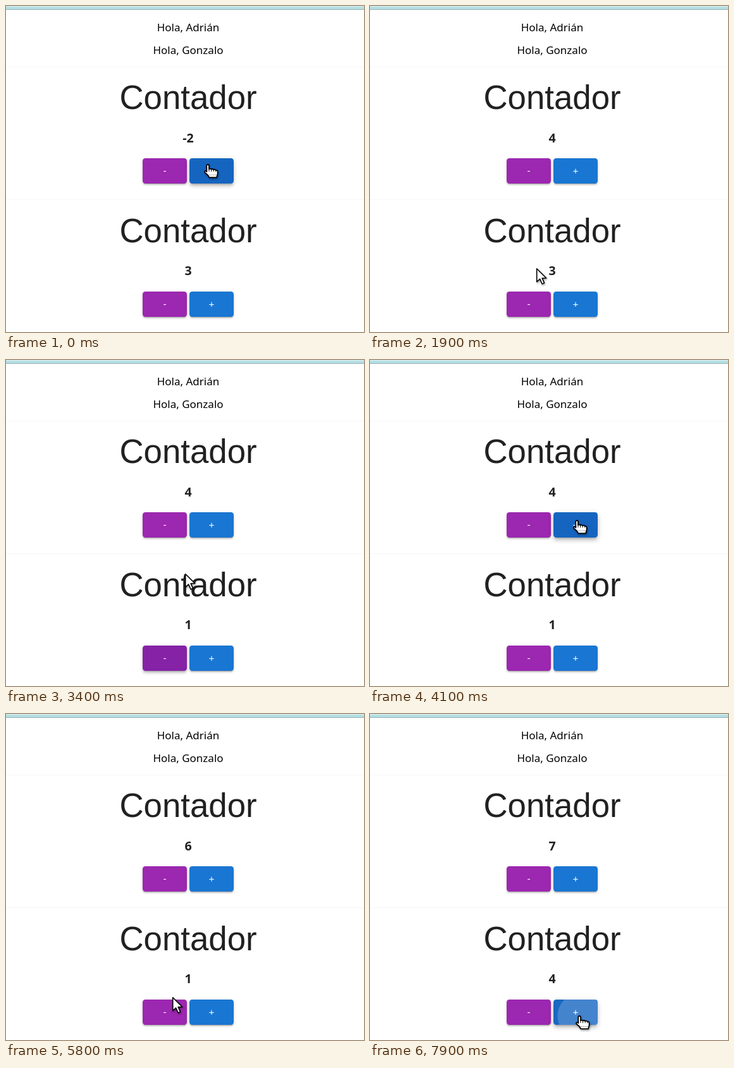
An HTML page for the animation above (8 s loop, 566 by 516 pixels).

```html
<!DOCTYPE html>
<html lang="es">
<head>
<meta charset="utf-8">
<title>Contador</title>
<style>
  html, body { margin: 0; width: 100%; height: 100%; overflow: hidden; background: #fff; }
  #stage { position: relative; width: 566px; height: 516px; overflow: hidden; }
  svg { position: absolute; left: 0; top: 0; overflow: visible; }
  text { text-anchor: middle; }
  .hello { font: 17px "Noto Sans", "Open Sans", sans-serif; }
  .title { font: 52.8px "Liberation Sans", Arial, sans-serif; fill: #212121; }
  .count { font: bold 19.6px "Noto Sans", "Open Sans", sans-serif; fill: #212121; }
  .btn {
    position: absolute; width: 70px; height: 40px; border-radius: 4.4px;
    color: #fff; font: 15.4px/40px "Liberation Sans", Arial, sans-serif; text-align: center;
  }
  .clip { position: absolute; inset: 0; overflow: hidden; border-radius: inherit; }
  .ripple { position: absolute; border-radius: 50%; background: #fff; }
  #cursor { filter: drop-shadow(1px 2px 1.5px rgba(0, 0, 0, .35)); }
  #cursor path { stroke-linejoin: round; stroke-linecap: round; }
</style>
</head>
<body>
<div id="stage">
  <svg width="566" height="516">
    <rect width="566" height="1" fill="#e2f2f3"/>
    <rect y="1" width="566" height="4" fill="#b4e0e4"/>
    <rect y="5" width="566" height="1" fill="#93adb0"/>
    <rect y="96" width="566" height="1" fill="#f7f7f7"/>
    <rect y="306" width="566" height="1" fill="#f7f7f7"/>
    <text class="hello" x="288" y="40">Hola, Adrián</text>
    <text class="hello" x="288" y="76">Hola, Gonzalo</text>
    <text class="title" x="288" y="163">Contador</text>
    <text class="count" x="288" y="216"></text>
    <text class="title" x="288" y="374">Contador</text>
    <text class="count" x="288" y="426"></text>
  </svg>
  <div id="buttons"></div>
  <svg id="cursor" width="30" height="30">
    <g id="arrow">
      <path d="M.7 .8V21.6L5.6 17.2L9.2 25L12.6 23.4L9.2 15.8H15.8Z" fill="#fff" stroke="#000" stroke-width="1.6"/>
    </g>
    <g id="hand" transform="translate(-7 -1)">
      <path d="M4.2 3Q4.2 1 6.1 1Q8 1 8 3V8.2Q10 6.8 11.6 8.5Q13.6 7.3 15.2 9.1Q17.2 8 18.7 9.9Q21.6 9.6 21.6 12.4V16L20 21.4H8.2L6.4 18L1.3 13.4Q.6 11.2 2.6 10.8L4.4 12.4Z" fill="#fff" stroke="#000" stroke-width="1.8"/>
      <path d="M8 8.5V11.5M11.6 9V11.8M15.2 9.5V11.8M18.7 10.2V12" fill="none" stroke="#000" stroke-width="1"/>
      <path d="M9 17.5H19.5" fill="none" stroke="#888" stroke-width="1" stroke-dasharray="1 2"/>
    </g>
  </svg>
</div>
<script>
const LOOP = 8000, STEP = 100, FADE = 250, RIPPLE = 550, HOLD = 110;
const W = 70, H = 40;

// Where the pointer stays; it moves straight from one stop to the next
const stop = (arrive, leave, x, y) => ({ arrive, leave, x, y });
const stops = [
  stop(-FADE, 1480, 320, 251),
  stop(2030, 3320, 246, 466),
  stop(3400, 3400, 283, 338),
  stop(4000, 5300, 328, 254),
  stop(5840, 5920, 258, 464),
  stop(6350, 6680, 326, 262),
  stop(7000, 7000, 324, 446),
  stop(7120, LOOP, 332, 478)
];

const tints = {
  '-': [[156, 39, 176], [123, 31, 162]],
  '+': [[25, 118, 210], [21, 101, 192]]
};
const startCounts = [-2, 3];

const mix = (a, b, k) => a + (b - a) * k;
const mixAll = (a, b, k) => a.map((v, i) => mix(v, b[i], k));

// cubic-bezier(.4, 0, .2, 1)
function ease(x) {
  if (x <= 0) return 0;
  if (x >= 1) return 1;
  let lo = 0, hi = 1, s;
  for (let i = 0; i < 20; i++) {
    s = (lo + hi) / 2;
    if (1.2 * s * (1 - s) ** 2 + .6 * s * s * (1 - s) + s ** 3 < x) lo = s; else hi = s;
  }
  return 3 * s * s * (1 - s) + s ** 3;
}

// 0 to 1: how far a state that holds during the spans has faded in
const level = (spans, t) => Math.min(1, spans.reduce(
  (sum, [a, b]) => sum + ease((t - a) / FADE) - ease((t - b) / FADE), 0));

function tipAt(t) {
  const i = stops.findLastIndex(s => s.arrive <= t);
  const a = stops[i], b = stops[i + 1];
  if (t <= a.leave || !b) return [a.x, a.y];
  return mixAll([a.x, a.y], [b.x, b.y], (t - a.leave) / (b.arrive - a.leave));
}

function isOver(b, t) {
  const [x, y] = tipAt(t);
  return x >= b.x && x < b.x + W && y >= b.y && y < b.y + H;
}

function hoverSpans(b) {
  const spans = [];
  let inside = false;
  for (let t = -FADE; t < LOOP; t += 10) {
    const over = isOver(b, t);
    if (over && !inside) spans.push([t, LOOP]);
    if (!over && inside) spans.at(-1)[1] = t;
    inside = over;
  }
  return spans;
}

// Three layers that grow with the elevation: 2 at rest, 4 hovered, 8 pressed
function shadowAt(k) {
  const e = 2.2 * 2 ** k;
  const layer = (y, blur, spread, alpha) => `0 ${y}px ${blur}px ${spread}px rgba(0,0,0,${alpha})`;
  return [
    layer(e / 2 + 1, e * .6, -e * .3 - .5, .2),
    layer(e, e * 1.25, 0, .14),
    layer(e * .35, e * 1.5 + 2.5, 0, .12)
  ].join(',');
}

function addDiv(parent, cls, style) {
  const el = document.createElement('div');
  el.className = cls;
  Object.assign(el.style, style);
  return parent.appendChild(el);
}

function makeButton(row, label) {
  const b = {
    row, x: label === '-' ? 216 : 290, y: 241 + 211 * row,
    add: label === '-' ? -1 : 1, tint: tints[label], clicks: []
  };
  b.hover = hoverSpans(b);
  b.el = addDiv(document.getElementById('buttons'), 'btn', { left: b.x + 'px', top: b.y + 'px' });
  b.el.textContent = label;
  b.clip = addDiv(b.el, 'clip', {});
  return b;
}

function addClicks(b, first, count, gap) {
  for (let i = 0; i < count; i++) {
    const press = first + i * gap;
    const [tx, ty] = tipAt(press), x = tx - b.x, y = ty - b.y;
    const size = Math.hypot(2 * Math.max(x, W - x) + 2, 2 * Math.max(y, H - y) + 2);
    const ripple = addDiv(b.clip, 'ripple', {
      left: x - size / 2 + 'px', top: y - size / 2 + 'px', width: size + 'px', height: size + 'px'
    });
    b.clicks.push({ press, release: press + HOLD, ripple });
  }
}

const buttons = [0, 1].flatMap(row => ['-', '+'].map(label => makeButton(row, label)));
const [, plusTop, minusLow, plusLow] = buttons;
addClicks(plusTop, 200, 6, 200);
addClicks(minusLow, 2200, 2, 400);
addClicks(plusTop, 4040, 2, 1040);
addClicks(plusTop, 6400, 1, 0);
addClicks(plusLow, 7175, 3, 240);

const counts = document.querySelectorAll('.count');
const cursor = document.getElementById('cursor');
const arrow = document.getElementById('arrow');
const hand = document.getElementById('hand');

function render(t) {
  const values = [...startCounts];
  for (const b of buttons) {
    const hover = level(b.hover, t);
    const pressed = level(b.clicks.map(c => [c.press, c.release]), t);
    b.el.style.backgroundColor = `rgb(${mixAll(...b.tint, hover).map(Math.round)})`;
    b.el.style.boxShadow = shadowAt(hover + pressed);
    for (const { press, release, ripple } of b.clicks) {
      const grow = ease((t - press) / RIPPLE);
      const fade = 1 - ease((t - release) / RIPPLE);
      ripple.style.transform = `scale(${grow})`;
      ripple.style.opacity = mix(.1, .3, grow) * fade;
      if (t >= release) values[b.row] += b.add;
    }
  }
  values.forEach((v, i) => { counts[i].textContent = v; });
  const [x, y] = tipAt(t).map(Math.round);
  const pointing = buttons.some(b => isOver(b, t));
  cursor.style.transform = `translate(${x}px, ${y}px)`;
  arrow.style.display = pointing ? 'none' : '';
  hand.style.display = pointing ? '' : 'none';
}

const start = performance.now();
function tick() {
  const t = Math.max(0, performance.now() - start) % LOOP;
  render(Math.floor(t / STEP) * STEP);
  requestAnimationFrame(tick);
}
tick();
</script>
</body>
</html>
```
